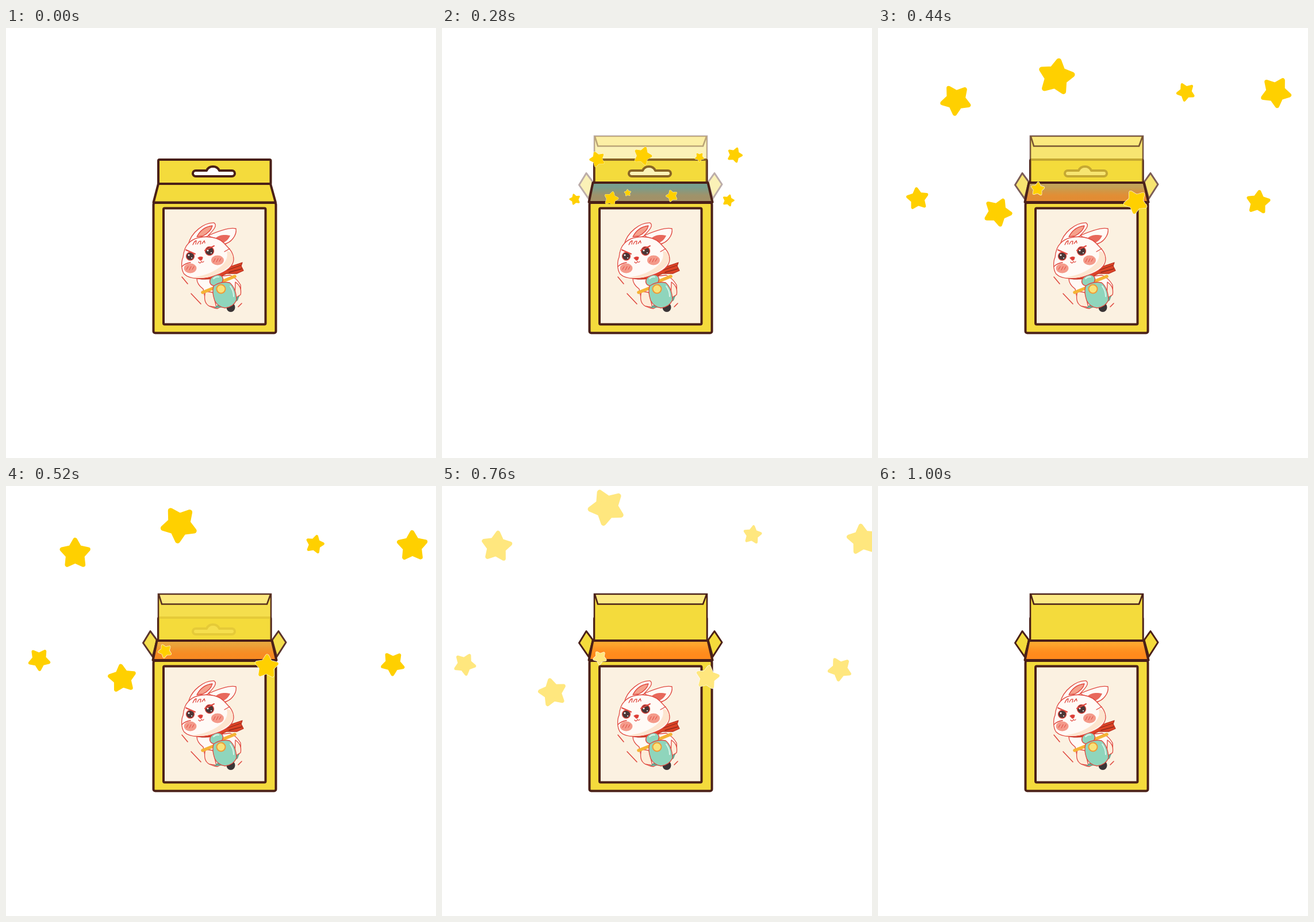
Write an HTML page that moves like this. It is 748 by 748 pixels and loops after 1120 ms.

```html
<!DOCTYPE html>
<html lang="en">
<head>
<meta charset="utf-8">
<title>Surprise box</title>
<style>
  html, body { margin: 0; width: 100%; height: 100%; overflow: hidden; background: #fff; }
  svg { display: block; width: 100vw; height: 100vh; }
  .box { stroke: #4a2018; stroke-width: 4; stroke-linejoin: round; fill: #f4db3c; }
  .ink { stroke: #e0483f; stroke-width: 1.3; stroke-linecap: round; stroke-linejoin: round; }
  .line { fill: none; }
</style>
</head>
<body>
<svg viewBox="0 0 748 748">
  <defs>
    <linearGradient id="blue" x2="0" y2="1">
      <stop stop-color="#269bc8"/><stop offset="1" stop-color="#4a98b0"/>
    </linearGradient>
    <linearGradient id="orange" x2="0" y2="1">
      <stop stop-color="#fdae33"/><stop offset=".75" stop-color="#ff8a1c"/>
    </linearGradient>
    <linearGradient id="glow" x2="0" y2="1">
      <stop offset=".25" stop-color="#ff8a1c" stop-opacity="0"/>
      <stop offset=".65" stop-color="#ff8a1c" stop-opacity=".6"/>
    </linearGradient>
    <clipPath id="behindFront"><path d="M0 0H748V748H470V306H255V748H0Z"/></clipPath>
  </defs>

  <!-- hanging header and closed top -->
  <rect class="box" x="265" y="229" width="195.500" height="43" rx="2"/>
  <path class="box" style="fill:#fff" d="M330 248H349Q352 241 360 241Q368 241 371 248H393a5 5 0 0 1 0 10H330a5 5 0 0 1 0-10Z"/>
  <path id="closedTop" class="box" d="M265 271H460L469 303.500H256.500Z"/>

  <!-- opened top -->
  <path id="inside" d="M262 269H463L471 303H255Z" fill="url(#blue)"/>
  <g id="flaps">
    <rect x="265" y="188" width="196" height="81" fill="#f4db3c"/>
    <path d="M266 188H460L454 205.500H271Z" fill="#fdea84"/>
    <path d="M265 269V188H461V269M266 189L271 205.500H454L460 189" fill="none" stroke="#4a2018" stroke-width="2.600"/>
    <path d="M262 269H463L471 303H255Z" fill="url(#orange)"/>
    <path d="M262 269H463L471 303H255Z" fill="url(#glow)"/>
    <path class="box" style="stroke-width:3" d="M251 252.500L262.500 268L255 297L238.500 273ZM474 252.500L463 268L471 297L487 272Z"/>
  </g>
  <path id="rim" class="box" style="fill:none" d="M262.500 269H462.500L470.500 303H255.500Z"/>

  <!-- front -->
  <rect class="box" x="256.500" y="304" width="213" height="226.500" rx="3"/>
  <rect class="box" style="fill:#fbf1e1" x="274" y="313.500" width="177.500" height="202" rx="2"/>

  <!-- rabbit on a scooter -->
  <g class="ink" fill="#fffaf6">
    <path d="M332 436Q332 446 343 454L348 478Q354 487 368 488L402 470Q410 464 408 447Q402 436 390 430Z"/>
    <path d="M347 458Q342 478 354 484L366 486L360 460ZM399 442Q411 450 408 464L398 470Z" fill="#fdecd9"/>
    <ellipse cx="391" cy="486" rx="7.500" ry="8" fill="#3a3536" stroke="none"/>
    <path d="M362 487L370 480L402 468L406 466L403 474L384 486Z" fill="#62a893" stroke="none"/>
    <path d="M328 430Q350 435 374 420L390 415L411 408L409 414L413 422L402 427L384 427Q360 440 335 436Z" fill="#dd4426" stroke="#b82f20"/>
    <path class="line" d="M382 422L408 413M388 425L410 419" stroke="#8d2a1c"/>
    <path class="line" d="M342 460L362 452M376 441L398 432" stroke="#f5b335" stroke-width="5.500"/>
    <ellipse cx="366" cy="439" rx="12" ry="9" transform="rotate(-25 366 439)" fill="#8fd5bc"/>
    <path d="M361 449Q373 440 389 443Q400 452 401 473Q396 485 381 487Q368 485 363 474Q358 460 361 449Z" fill="#8fd5bc"/>
    <path class="line" d="M390 449Q396 457 396 467M361 436Q365 432 370 433" stroke="#d9f4ea" stroke-width="2"/>
    <circle cx="374" cy="454" r="7.500" fill="#f8e27a" stroke="#f09a36" stroke-width="2"/>

    <path d="M317 377C322 355 345 338 362 339C369 344 359 353 351 362Z"/>
    <path d="M332 363C339 350 349 345 359 344C357 352 350 358 342 362Z" fill="#f5a18c"/>
    <path d="M352 361C370 353 389 346 400 349C402 361 391 374 379 376Z"/>
    <path d="M365 365C374 358 383 360 390 361C387 368 382 372 377 374Z" fill="#e8685c" stroke="none"/>
    <path d="M317 375C330 360 364 359 379 374C387 383 395 388 396 402C396 414 384 424 365 430C346 438 320 438 310 428C304 420 305 405 308 399C309 388 311 381 317 375Z"/>
    <path d="M384 388Q396 389 395 403Q393 416 365 429Q346 437 322 434Q352 431 372 416Q388 404 384 388Z" fill="#fde5cf" stroke="none"/>
    <path class="line" d="M325 377Q328 370 331 370L330 376M333 376Q335 370 339 371L338 376M341 375L345 370L346 374M306 415Q312 409 321 408M380 389L389 384"/>
    <g fill="#f49a8a" stroke="none">
      <ellipse cx="320.500" cy="418" rx="11" ry="8.500"/><ellipse cx="368" cy="404" rx="11" ry="8.500"/>
    </g>
    <path class="line" d="M314 420L317 415M319 421L322 415M324 420L327 415M361 407L364 401M366 407L369 401M371 406L374 401" stroke-width="1"/>
    <g fill="#4a3636">
      <circle cx="320.500" cy="397" r="7"/><circle cx="354" cy="388" r="7.500"/>
    </g>
    <g fill="#fff" stroke="none">
      <circle cx="318" cy="395" r="1.500"/><circle cx="351" cy="387" r="1.500"/>
      <circle cx="323" cy="400" r="1"/><circle cx="357" cy="391" r="1"/>
    </g>
    <path class="line" d="M313 386L329 393M346 387L362 379" stroke-width="2"/>
    <path d="M334 400Q338 397 342 399Q341 404 338 404Z" fill="#dd3a36"/>
    <path class="line" d="M335 407Q338 411 340 406Q342 409 344 406"/>
    <path class="line" d="M306 433L316 445M322 462L339 480M404 485L410 479" stroke-width="1.600"/>
  </g>

  <g id="stars" stroke-linejoin="round"></g>
</svg>
<script>
const LOOP = 1120, TICK = 40, LIFE = 21;
const ORIGIN = { x: 365, y: 312 };
const byId = id => document.getElementById(id);

// end point from the origin, total drift, radius, angle at tick 12, spin direction
const STARS = [
  [-84, -286, -83, -170, 32.9, 0, 1],
  [-279, -211, -142, -69, 27.7, 31, 1],
  [176, -233, 16, -93, 16.8, -17, -1],
  [375, -223, 138, -65, 27.7, 40, -1],
  [-332, 1, -103, 46, 20, 3, -1],
  [-176, 56, -55, 137, 25.5, 34, -1],
  [-91, -9, -11, 66, 12, 15, -1],
  [100, 28, 48, 108, 21, 34, 1],
  [334, 10, 108, 54, 21.5, -3, 1]
].map(([x, y, dx, dy, radius, angle, spin]) => ({ x, y, dx, dy, radius, angle, spin }));

const starPoints = Array.from({ length: 10 }, (_, i) => {
  const r = i % 2 ? 0.47 : 0.86, a = i * Math.PI / 5;
  return `${(r * Math.sin(a)).toFixed(3)},${(-r * Math.cos(a)).toFixed(3)}`;
}).join(' ');

function addNode(parent, name, attributes = {}) {
  const node = document.createElementNS('http://www.w3.org/2000/svg', name);
  for (const key in attributes) node.setAttribute(key, attributes[key]);
  return parent.appendChild(node);
}

function addStar(parent, color, strokeWidth) {
  return addNode(parent, 'polygon', { points: starPoints, fill: color, stroke: color, 'stroke-width': strokeWidth });
}

// Each star is yellow on a slightly larger white one, and only the yellow fades.
for (const star of STARS) {
  star.node = addNode(byId('stars'), 'g');
  addStar(star.node, '#fff', 0.28 + 1.2 / star.radius);
  star.face = addStar(star.node, '#ffd000', 0.28);
}

// Motion advances in ticks; late ticks drop every third update.
function tickAt(time) {
  let tick = Math.floor(time / TICK) - 3;
  if (tick > 11) tick -= 1;
  if (tick > 12 && tick % 3 === 1) tick -= 1;
  return tick;
}

function draw(time) {
  const tick = tickAt(time);
  const open = tick > 0;
  const show = (id, on) => byId(id).setAttribute('visibility', on ? 'visible' : 'hidden');
  show('closedTop', !open);
  for (const id of ['inside', 'flaps', 'rim']) show(id, open);
  const flapOpacity = Math.max(0, Math.min(1, tick / 11));
  for (const part of byId('flaps').children) part.setAttribute('opacity', flapOpacity);

  const flying = open && tick < LIFE;
  show('stars', flying);
  if (!flying) return;
  byId('stars').setAttribute('clip-path', tick < 7 ? 'url(#behindFront)' : 'none');

  const scale = Math.min(1, tick / 8);
  const left = (1 - tick / LIFE) ** 2.2;
  const faceOpacity = Math.min(1, ((LIFE - tick) / 9) ** 1.7);
  for (const s of STARS) {
    const x = ORIGIN.x + scale * (s.x - s.dx * left);
    const y = ORIGIN.y + scale * (s.y - s.dy * left);
    const angle = s.angle + s.spin * 15.6 * (tick - 12);
    s.node.setAttribute('transform', `translate(${x} ${y}) rotate(${angle}) scale(${scale * s.radius})`);
    s.face.setAttribute('opacity', faceOpacity);
  }
}

const start = performance.now();
function loop() {
  draw((performance.now() - start) % LOOP);
  requestAnimationFrame(loop);
}
loop();
</script>
</body>
</html>
```
